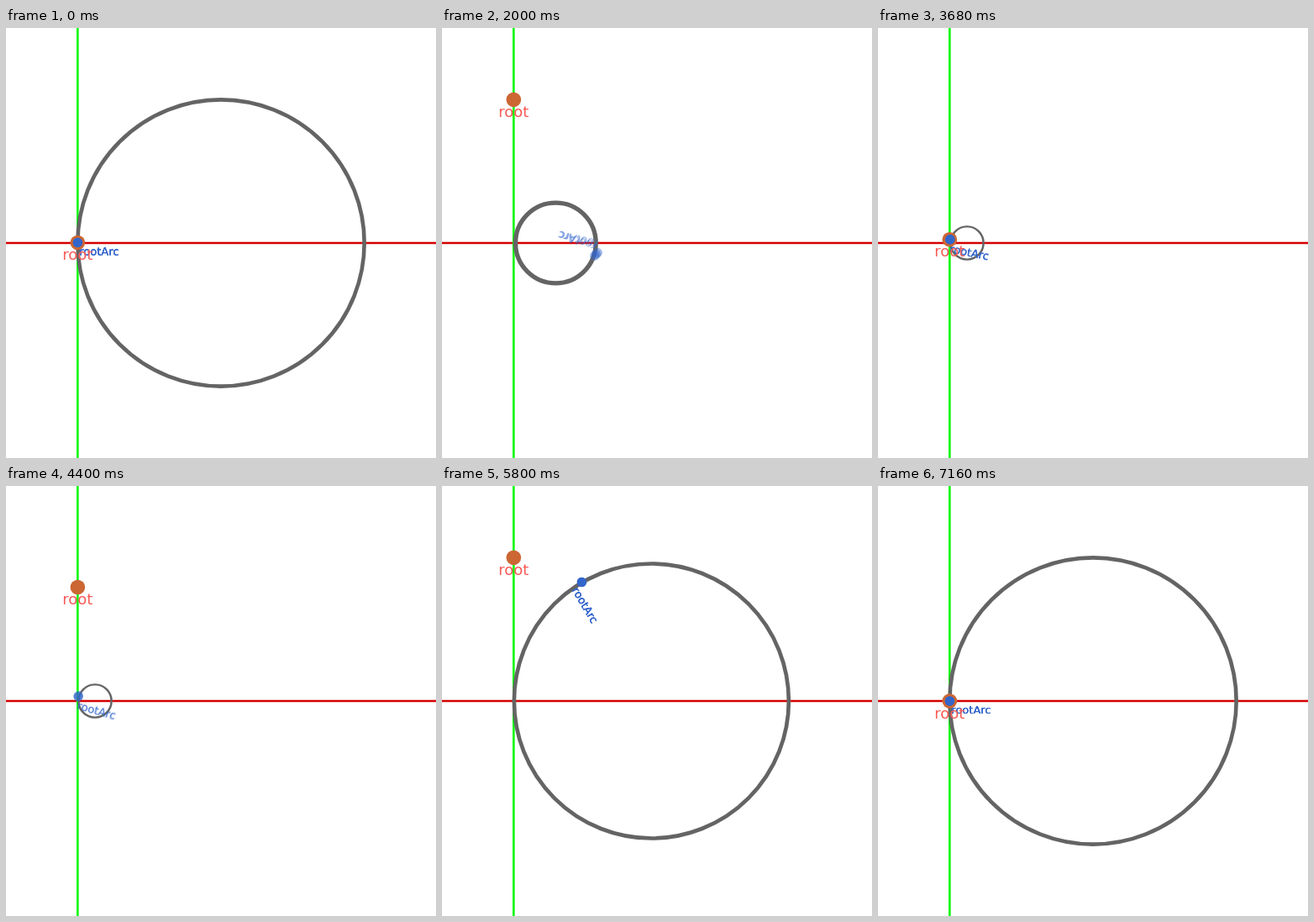
Animation of 512 by 512 pixels, one loop 7200 ms. Source, as an HTML page:

```html
<!DOCTYPE html>
<html lang="en">
<head>
<meta charset="utf-8">
<title>Arc bend</title>
<style>
  html, body { margin: 0; width: 100%; height: 100%; overflow: hidden; background: #fff; }
  svg { display: block; width: 100%; height: 100%; }
  text { font-family: "DejaVu Sans", sans-serif; }
  .axis { stroke-width: 2.6; }
  #ring { fill: none; stroke: #646464; }
  #arm circle, #arm text { fill: #3366cc; }
  #dot { fill: #cc6633; }
  #label { fill: #f85a55; }
</style>
</head>
<body>
<svg viewBox="0 0 512 512">
  <defs>
    <g id="arm">
      <circle r="5.6"/>
      <text x="2" y="15" font-size="13">rootArc</text>
    </g>
  </defs>
  <path class="axis" d="M0 256H512" stroke="#d40000"/>
  <path class="axis" d="M85.33 0V512" stroke="#00f800"/>
  <circle id="ring" cy="256"/>
  <circle id="dot" cx="85.33" r="8.8"/>
  <g id="arms">
    <use href="#arm"/>
    <use href="#arm"/>
    <use href="#arm"/>
  </g>
  <text id="label" x="85.33" font-size="18" text-anchor="middle">root</text>
</svg>
<script>
const STEP = 40, STEPS = 180, HALF = 90;
const UNIT = 512 / 3, X0 = 512 / 6, Y0 = 256;
const MIN_RADIUS = 0.121;
const [ring, dot, label] = ["ring", "dot", "label"].map(id => document.getElementById(id));
const arms = [...document.querySelectorAll("#arms use")];

const ease = u => (1 - Math.cos(Math.PI * Math.min(1, Math.max(0, u)))) / 2;

// Slide out along the axis, curl the circle up, slide back; then reverse.
function pose(time) {
  const t = HALF - Math.abs(time - HALF);
  const slide = ease(t / 30) - ease((t - 60) / 30);
  const radius = UNIT * (1 - (1 - MIN_RADIUS) * ease((t - 30) / 29.65));
  return { length: slide * UNIT, radius, angle: slide * UNIT / radius };
}

function placeArm(arm, { radius, angle }, opacity) {
  const x = X0 + radius * (1 - Math.cos(angle));
  const y = Y0 - radius * Math.sin(angle);
  arm.setAttribute("transform", `translate(${x} ${y}) rotate(${angle * 180 / Math.PI})`);
  arm.setAttribute("opacity", opacity);
}

function draw(time) {
  const now = pose(time);
  const r = now.radius;
  const inset = Math.min(0.05 * r, 2.6 * Math.sqrt(1 - r / UNIT));
  ring.setAttribute("cx", X0 + r);
  ring.setAttribute("r", r - inset);
  ring.setAttribute("stroke-width", Math.min(0.12 * r, 5.4 - 0.8 * (r / UNIT) ** 2));

  dot.setAttribute("cy", Y0 - now.length);
  label.setAttribute("y", Y0 - now.length + 20.5);

  // Fast turns leave a faint smear.
  const turn = Math.abs(pose(time + 0.5).angle - pose(time - 0.5).angle);
  const opacity = 1 - 0.55 * Math.min(1, Math.max(0, turn - 0.05) / 0.3);
  arms.forEach((arm, i) => placeArm(arm, pose(time + (i - 1) * 0.1), opacity));
}

function tick() {
  const step = Math.floor(performance.now() / STEP) % STEPS;
  draw(step + 1);
  requestAnimationFrame(tick);
}
tick();
</script>
</body>
</html>
```
